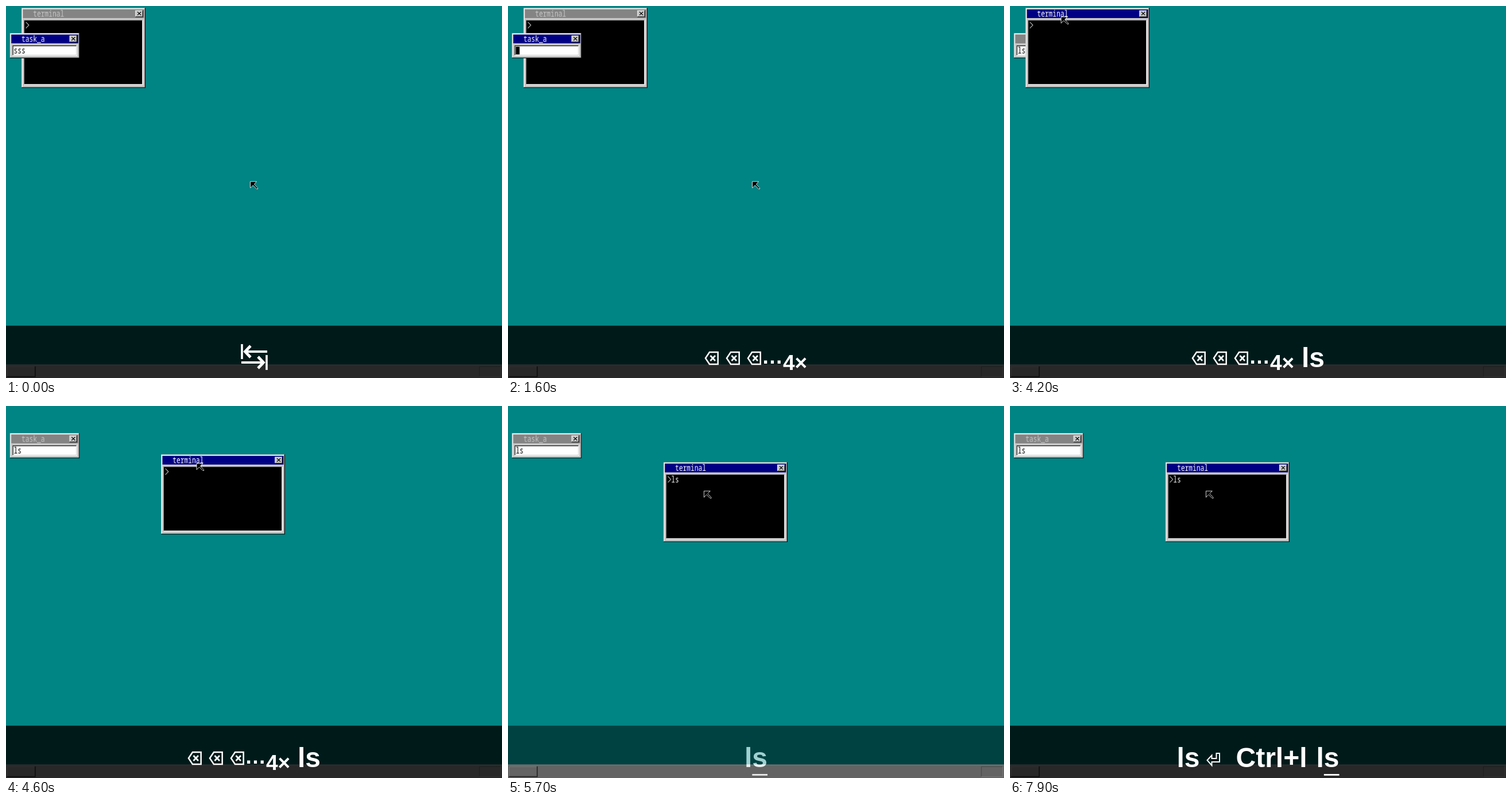
An HTML page with a canvas for the animation above (8000 ms loop, 864 by 648 pixels).

```html
<!DOCTYPE html>
<html>
<head>
<meta charset="utf-8">
<style>
html, body { margin: 0; width: 100%; height: 100%; overflow: hidden; background: #008484; }
canvas { display: block; }
</style>
</head>
<body>
<canvas id="stage" width="864" height="648"></canvas>
<script>
const LOOP = 8000, STEP = 100;
const GRAY = '#c6c6c6', DARK = '#848484', TEAL = '#008484', NAVY = '#000084', WHITE = '#fff', BLACK = '#000';

const stage = document.getElementById('stage').getContext('2d');
stage.imageSmoothingQuality = 'high';

function layer(w, h) {
  const canvas = document.createElement('canvas');
  canvas.width = w;
  canvas.height = h;
  return canvas.getContext('2d');
}
const desk = layer(1024, 768);  // the desktop at its own resolution
const osd = layer(864, 648);    // the key display

// Value of the last [time, value] entry that has begun.
const at = (track, t) => track.filter(e => e[0] <= t).pop()[1];

// Linear path through [time, x, y] points.
function along(path, t) {
  let i = 0;
  while (i < path.length - 2 && t >= path[i + 1][0]) i++;
  const [a, b] = [path[i], path[i + 1]];
  const k = Math.min(1, Math.max(0, (t - a[0]) / (b[0] - a[0])));
  return [1, 2].map(n => Math.round(a[n] + (b[n] - a[n]) * k));
}

function trace(g, points, close) {
  g.beginPath();
  points.forEach(p => g.lineTo(...p));
  if (close) g.closePath();
}

// ---- desktop ----

// Filled box with inclusive corners.
function box(color, x0, y0, x1, y1) {
  desk.fillStyle = color;
  desk.fillRect(x0, y0, x1 - x0 + 1, y1 - y0 + 1);
}

// Text in tall 8 x 16 cells.
function text(s, x, y, color) {
  desk.save();
  desk.translate(x, y + 14);
  desk.scale(1, 1.36);
  desk.font = '300 13.333px "Noto Sans Mono", monospace';
  desk.fillStyle = color;
  desk.fillText(s, 0, 0);
  desk.restore();
}

function prompt(x, y) {
  trace(desk, [[x + 1, y + 1], [x + 7, y + 7.5], [x + 1, y + 14]]);
  desk.strokeStyle = WHITE;
  desk.lineWidth = 1.1;
  desk.stroke();
}

function closeButton(x) {
  box(BLACK, x, 5, x + 15, 18);
  box(WHITE, x, 5, x + 14, 17);
  box(DARK, x + 1, 6, x + 14, 17);
  box(GRAY, x + 1, 6, x + 13, 16);
  for (let i = 0; i < 7; i++) {
    box(BLACK, x + 4 + i, 8 + i, x + 5 + i, 8 + i);
    box(BLACK, x + 10 - i, 8 + i, x + 11 - i, 8 + i);
  }
}

function makeWindow(x, y, w, h, title, active, paper, content) {
  desk.save();
  desk.translate(x, y);
  box(BLACK, 0, 0, w - 1, h - 1);
  box(GRAY, 0, 0, w - 2, h - 2);
  box(DARK, 1, 1, w - 2, h - 2);
  box(WHITE, 1, 1, w - 3, h - 3);
  box(GRAY, 2, 2, w - 3, h - 3);
  box(active ? NAVY : DARK, 3, 3, w - 4, 20);
  text(title, 24, 4, active ? WHITE : GRAY);
  closeButton(w - 21);
  const r = w - 8, b = h - 9 + (h < 60 ? 1 : 0);
  box(WHITE, 5, 25, r + 2, b + 2);
  box(DARK, 5, 25, r + 1, b + 1);
  box(GRAY, 6, 26, r + 1, b + 1);
  box(BLACK, 6, 26, r, b);
  box(paper, 7, 27, r, b);
  content();
  desk.restore();
}

function taskbar() {
  box(GRAY, 0, 740, 1023, 767);
  box(WHITE, 0, 741, 1023, 741);
  box(BLACK, 2, 744, 60, 765);
  box(DARK, 2, 744, 59, 764);
  box(WHITE, 2, 744, 58, 763);
  box(GRAY, 3, 745, 58, 763);
  box(WHITE, 977, 744, 1021, 765);
  box(DARK, 977, 744, 1020, 764);
  box(GRAY, 978, 745, 1020, 764);
}

const ARROW = [[0, 0], [13, 0], [8, 5], [8, 6], [15, 13], [15, 15], [13, 15], [6, 8], [5, 8], [0, 13]];

function pointer(x, y) {
  trace(desk, ARROW.map(([a, b]) => [x + a + .5, y + b + .5]), true);
  desk.fillStyle = BLACK;
  desk.fill();
  desk.strokeStyle = WHITE;
  desk.lineWidth = 1;
  desk.stroke();
}

const GRAB = 4200, DROP = 4700;
const mousePath = [[3600, 504, 362], [GRAB, 105, 22], [4500, 335, 98], [4600, 393, 118], [DROP, 394, 134], [5100, 404, 175]];
const listing = [['WINHELO', 7960], ['WINHELO2', 8020], ['WINHELO3', 516], ['STAR1', 580],
  ['STAR2', 604], ['LINES', 566], ['WALK', 663]]
  .map(([name, size]) => name.padEnd(8) + '.HRB' + String(size).padStart(11));

const taskText = [[0, 'sss'], [700, 'ss'], [900, 's'], [1000, ''], [2400, 'l'], [2500, 'ls']];
const shell = [[0, ['>']], [5600, ['>l']], [5700, ['>ls']], [5800, [...listing, '>']],
  [7100, ['>']], [7700, ['>l']], [7900, ['>ls']]];
const taskCaret = [[0, 0], [1600, 1], [2000, 0], [2500, 1], [3000, 0], [3500, 1], [4000, 0]];
const shellCaret = [[0, 0], [6700, 1], [7100, 0]];

function drawTask(t) {
  makeWindow(8, 56, 144, 52, 'task_a', t < GRAB, WHITE, () => {
    const s = at(taskText, t), end = 8 + s.length * 8;
    text(s, 8, 28, BLACK);
    if (at(taskCaret, t)) box(BLACK, end, 28, end + 7, 43);
  });
}

function drawTerminal(t) {
  const [mx, my] = along(mousePath, Math.min(DROP, Math.max(GRAB, t)));
  makeWindow(mx - 73, my - 18, 256, 165, 'terminal', t >= GRAB, BLACK, () => {
    const lines = at(shell, t);
    lines.forEach((line, i) => {
      const y = 28 + i * 16;
      if (line[0] === '>') prompt(8, y);
      text(line.replace('>', ' '), 8, y, WHITE);
    });
    const y = 28 + (lines.length - 1) * 16;
    if (at(shellCaret, t)) box(WHITE, 16, y, 23, y + 15);
  });
}

function drawDesk(t) {
  box(TEAL, 0, 0, 1023, 767);
  taskbar();
  const windows = [drawTerminal, drawTask];
  if (t >= GRAB) windows.reverse();
  windows.forEach(draw => draw(t));
  pointer(...along(mousePath, t));
}

// ---- key display ----

const BIG = 'bold 48px "Liberation Sans", Arial, sans-serif';
const SMALL = 'bold 37px "Liberation Sans", Arial, sans-serif';

function line(width, points, close) {
  osd.lineWidth = width;
  trace(osd, points, close);
  osd.stroke();
}

function write(font, s, x, y) {
  osd.font = font;
  osd.fillText(s, x, y);
}

function tabHalf(x, y, dir) {
  const p = (a, b) => [x + dir * a, y + b];
  line(3.6, [p(0, -13), p(0, 13)]);
  line(4.2, [p(5, 0), p(44, 0)]);
  line(4.8, [p(15, -10), p(5.5, 0), p(15, 10)]);
}

// Each key: its width and how to draw it from its left edge.
const tab = { w: 46, draw(x) { tabHalf(x + 2, 602, 1); tabHalf(x + 45, 621, -1); } };
const back = { w: 26, draw(x) {
  line(2.5, [[x + 2, 613.5], [x + 9, 603], [x + 23.7, 603], [x + 23.7, 624], [x + 9, 624]], true);
  line(2.7, [[x + 10.5, 609], [x + 19, 618]]);
  line(2.7, [[x + 19, 609], [x + 10.5, 618]]);
} };
const enter = { w: 26, draw(x) {
  line(2, [[18, 605], [23.5, 605], [23.5, 620], [10, 620], [10, 626], [2, 617], [10, 608.5], [10, 614], [18, 614]]
    .map(([a, b]) => [x + a, b]), true);
} };
const times = { w: 80, draw(x) { write(SMALL, '…', x, 623); write(SMALL, '4×', x + 37, 634); } };
const gap = w => ({ w, draw() {} });
function word(s) {
  osd.font = BIG;
  return { w: osd.measureText(s).width, draw(x) { write(BIG, s, x, 629); } };
}

const sp = gap(11), l = word('l'), s = word('s');
const many = [back, sp, back, sp, back, times];
const ran = [l, s, sp, enter];
const cleared = [...ran, gap(26), word('Ctrl+l')];
const keys = [[0, [tab]], [500, [back]], [700, [back, sp, back]], [900, many.slice(0, 5)], [1100, many],
  [2400, [...many, gap(12), l]], [2500, [...many, gap(12), l, s]],
  [5500, [l]], [5700, [l, s]], [5800, ran], [7100, cleared],
  [7700, [...cleared, gap(16), l]], [7900, [...cleared, gap(16), l, s]]];
// The newest key stays underlined for a moment.
const recent = [[0, 0], [500, 1], [1300, 0], [2400, 1], [2600, 0], [5500, 1], [6000, 0], [7100, 1], [7300, 0], [7700, 1]];

const fades = [[240, 500, 1, 0], [500, 820, 0, 1], [5140, 5400, 1, 0], [5500, 5820, 0, 1]];
function opacity(t) {
  const f = fades.filter(e => e[0] <= t).pop();
  if (!f) return 1;
  return f[2] + (f[3] - f[2]) * Math.min(1, (t - f[0]) / (f[1] - f[0]));
}

function drawKeys(t) {
  osd.clearRect(0, 0, 864, 648);
  osd.fillStyle = 'rgba(0,0,0,.8)';
  osd.fillRect(0, 556.875, 864, 92);
  osd.fillStyle = osd.strokeStyle = WHITE;
  const row = at(keys, t);
  let x = 432 - row.reduce((sum, k) => sum + k.w, 0) / 2;
  row.forEach((k, i) => {
    k.draw(x);
    if (i === row.length - 1 && at(recent, t)) osd.fillRect(x, 641, k.w, 2.8);
    x += k.w;
  });
}

function frame() {
  const t = Math.floor(performance.now() % LOOP / STEP) * STEP;
  drawDesk(t);
  drawKeys(t);
  stage.globalAlpha = 1;
  stage.drawImage(desk.canvas, 0, 0, 864, 648);
  stage.globalAlpha = opacity(t);
  stage.drawImage(osd.canvas, 0, 0);
  requestAnimationFrame(frame);
}
frame();
</script>
</body>
</html>
```
